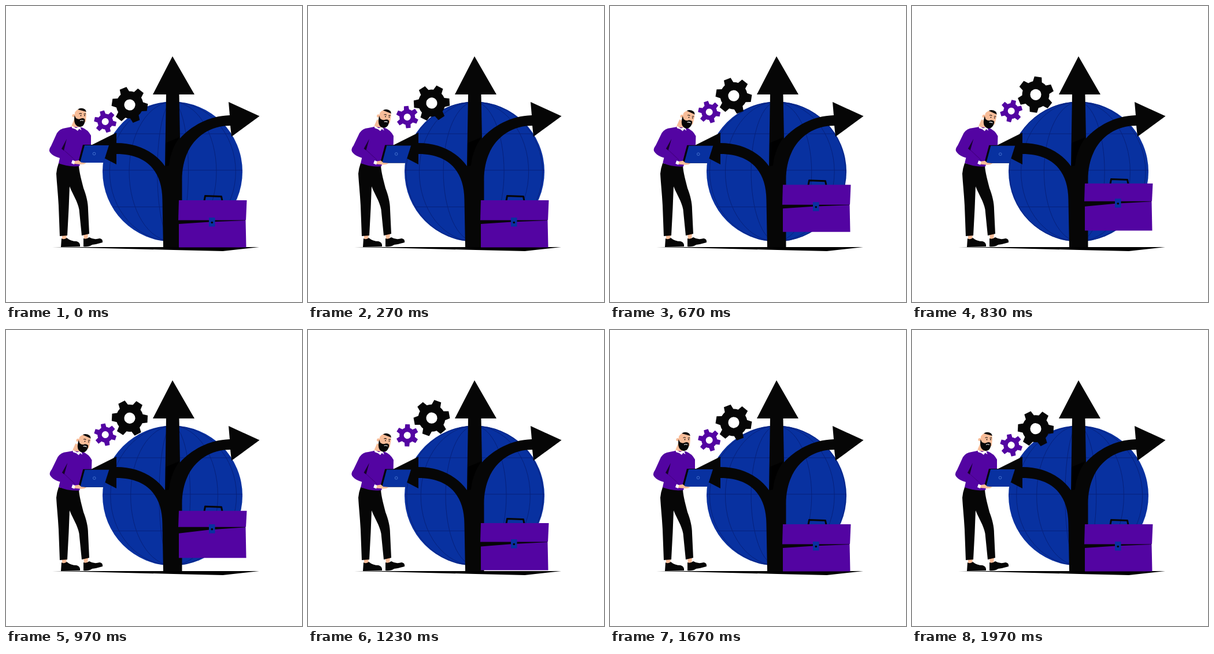
Recreate the animation shown at these times as an HTML page. Size 512 by 512 pixels, loop 2000 ms.

```html
<!DOCTYPE html>
<html lang="en">
<head>
<meta charset="utf-8">
<title>Choosing a career path</title>
<style>
  html, body { margin: 0; width: 100%; height: 100%; overflow: hidden; background: #fff; }
  svg { display: block; width: 100%; height: 100%; }
  .ink { fill: #060606; }
  .violet { fill: #5304a2; }
  .blue { fill: #0831a0; }
  .skin { fill: #f8bd99; }
  .white { fill: #fff; }
  .grid { fill: none; stroke: #06217c; stroke-width: 1; }
</style>
</head>
<body>
<svg viewBox="0 0 512 512">
  <!-- globe -->
  <circle class="blue" cx="288" cy="286.5" r="121"/>
  <path class="grid" d="M187 221H389M167 284H409M184 347.500H392"/>
  <path class="grid" id="meridians"/>

  <!-- arrows -->
  <path class="ink" d="M288 87L326 153H299.500L301 229C320 208 350 190 387 189L385 166L438.500 190.500L390 226L388 207C340 207 303 243 304.500 304V417H272L270.500 335C270 284 242 256 191 256V274L137 246L191 219V237C226 237 256 251 275 277L277 153H254Z"/>
  <path d="M276 237L300 227C291 240 283 258 282 276L276 277Z" fill="#000"/>

  <path class="ink" id="bigGear" fill-rule="evenodd"/>
  <path class="violet" id="smallGear" fill-rule="evenodd"/>

  <path d="M80 417H438L375 424L290 422L150 418.500Z" fill="#000"/>

  <!-- briefcase -->
  <g id="briefcase">
    <path d="M343 337L344.500 328.500L372.500 329.500L374 337" fill="none" stroke="#060606" stroke-width="3" stroke-linejoin="round"/>
    <path class="ink" d="M299 360H414V380H299Z"/>
    <path class="violet" id="caseBody"/>
    <path class="violet" id="caseFlap"/>
    <g id="clasp">
      <path class="blue" d="M351 366H361.500V381.500H351Z"/>
      <circle class="ink" cx="356.300" cy="374.500" r="1.800"/>
    </g>
  </g>

  <!-- legs and shoes -->
  <path class="skin" d="M97 395H105L104 405H97ZM134 394H142L141 404H135Z"/>
  <g class="ink">
    <path d="M91 272L126 276C127 290 131 302 134 315C139 328 142 340 142 352L144 394L131 397L126.500 352C124 338 115 325 110 312L108.500 350L106 397L93 398L91 345C90 325 88 308 87 290Q88 280 91 272Z"/>
    <path d="M95 417L96 402Q100 405 105 401Q112 407 122 407Q129 409 128 416Z"/>
    <path d="M134 416V402Q139 404 144 400Q152 405 162 402Q168 403 167 409Q157 412 149 413Q143 417 134 416Z"/>
  </g>

  <!-- upper body -->
  <g id="torso">
    <path class="skin" d="M118 196L128 200L129 213L121 216L112.500 209Z"/>
    <path class="violet" d="M113 209L131 210Q142 214 147 224V242L134 250L127 277Q108 279 91 272L93 263Q81 260 76 253Q73 249 78 242L88 220Q93 212 103 211Z"/>
    <path d="M105 230L96 247L100 250Z" fill="#17032b"/>
    <path d="M100 249L119 266" fill="none" stroke="#43017f" stroke-width="1"/>
    <path class="white" d="M113.500 207L121 211L128 208.500L130.500 215L126.500 212.500L124 216L120 213L114 211Z"/>
  </g>

  <g id="head">
    <path class="skin" d="M119 184Q123 177 132 178Q139 180 139 188L138 200L128 207L115 206L118.500 194Z"/>
    <circle class="skin" cx="117" cy="189.500" r="2.600"/>
    <path class="ink" d="M124 179Q130 174.500 137 179L139 183Q132 181 124 179Z"/>
    <path class="ink" d="M118.500 189L121 194Q126 197 130 194.500Q134 193 136.500 196Q137 204 132 208Q126 211 121 206Q117 202 118.500 189Z"/>
    <path d="M128 198.500Q131 197 134 198.500" fill="none" stroke="#fff" stroke-width="1.200"/>
    <path d="M126.500 186.500Q129 185 131 186.500M134.500 187L138 186.500" fill="none" stroke="#060606" stroke-width="1"/>
    <circle class="ink" cx="129.500" cy="189.500" r=".9"/>
    <circle class="ink" cx="136" cy="189.500" r=".9"/>
  </g>

  <g id="laptop">
    <path class="ink" d="M133 240L179 240L168 271H130L125.500 268Z"/>
    <path class="blue" d="M136 241H178L168.500 271H128Z"/>
    <circle cx="152.500" cy="255.500" r="2.300" fill="none" stroke="#4673d0" stroke-width="1"/>
    <path class="white" d="M115 266.500L120 268.500L118 274L113 272Z"/>
    <path class="skin" d="M119.500 268L126 267L130 270.500L139 271.500Q136 274 130 274L118 273Z"/>
  </g>
</svg>
<script>
const LOOP = 2000;
const $ = id => document.getElementById(id);
const move = (id, value) => $(id).setAttribute('transform', value);
const shape = (id, d) => $(id).setAttribute('d', d);

// [time, value] tables
const GEAR_Y = [[0, 171], [90, 171], [270, 168], [530, 157.5], [670, 155.2], [970, 152.4],
  [1230, 152.2], [1670, 160], [1970, 170.7], [2000, 171]];
const CASE_Y = [[0, 0], [535, 0], [600, -15], [670, -26.7], [790, -29.5], [970, -23.4],
  [1100, -13], [1230, -2], [1290, 0], [2000, 0]];
const SEAM_Y = [[0, 0], [660, 0], [970, -6.5], [1230, -2], [1330, 0], [2000, 0]];
const LEAN = [[0, 0], [80, 0.1], [270, 0.65], [600, 1], [1000, 1], [1230, 0.65], [1600, 0], [2000, 0]];

// Smooth interpolation that never overshoots its points
function sample(points, t) {
  let i = 0;
  while (i < points.length - 2 && t >= points[i + 1][0]) i++;
  const slope = k => points[k + 1]
    ? (points[k + 1][1] - points[k][1]) / (points[k + 1][0] - points[k][0]) : 0;
  const tangent = k => {
    if (k === 0) return 0;
    const a = slope(k - 1), b = slope(k);
    return a * b > 0 ? 2 * a * b / (a + b) : 0;
  };
  const [t0, v0] = points[i], [t1, v1] = points[i + 1];
  const w = t1 - t0, u = (t - t0) / w, v = 1 - u;
  return v0 * (1 + 2 * u) * v * v + tangent(i) * w * u * v * v
    + v1 * u * u * (3 - 2 * u) - tangent(i + 1) * w * u * u * v;
}

function gearPath(outer, root, hole) {
  const at = (r, a) => `${(r * Math.cos(a)).toFixed(2)} ${(r * Math.sin(a)).toFixed(2)}`;
  let d = '';
  for (let k = 0; k < 6; k++) {
    const a = k * Math.PI / 3;
    d += k ? `A${root} ${root} 0 0 1 ` : 'M';
    d += `${at(root, a - 0.34)}L${at(outer, a - 0.2)}L${at(outer, a + 0.2)}L${at(root, a + 0.34)}`;
  }
  return d + `A${root} ${root} 0 0 1 ${at(root, -0.34)}Z`
    + `M${hole} 0A${hole} ${hole} 0 1 0 ${-hole} 0A${hole} ${hole} 0 1 0 ${hole} 0Z`;
}

function meridians(t) {
  const step = 360 / 14;
  const shift = t / 1000 * 2 * step % step;
  let d = '';
  for (let k = -4; k <= 5; k++) {
    const angle = -12.5 + k * step - shift;
    if (Math.abs(angle) >= 88) continue;
    const rx = 121 * Math.sin(angle * Math.PI / 180);
    d += `M288 166A${Math.abs(rx).toFixed(2)} 120.5 0 0 ${rx > 0 ? 1 : 0} 288 407`;
  }
  return d;
}

// The seam between flap and body lifts while the case drops
function drawCase(t) {
  const seam = sample(SEAM_Y, t);
  move('briefcase', `translate(0 ${sample(CASE_Y, t)})`);
  move('clasp', `translate(0 ${seam})`);
  shape('caseFlap', `M299 336H416.500L415 ${370.5 + seam}H298Z`);
  shape('caseBody', `M299 ${377 + seam * 0.3}L352 ${373.5 + seam * 0.7}L414.500 ${371 + seam}L415.500 417.500H299Z`);
}

function draw(t) {
  const turn = t / LOOP * 360;
  const lean = sample(LEAN, t);
  const smallY = 200 - 19 * Math.sin(Math.PI * t / LOOP);
  shape('meridians', meridians(t));
  move('bigGear', `translate(214 ${sample(GEAR_Y, t)}) rotate(${8 + turn})`);
  move('smallGear', `translate(171.7 ${smallY}) rotate(${13 - turn})`);
  drawCase(t);
  move('torso', `rotate(${1.6 * lean} 108 278)`);
  move('head', `translate(${4 * lean} ${1.5 * lean}) rotate(${9 * lean} 121 209)`);
  move('laptop', `translate(${0.3 * lean} ${0.7 * lean})`);
}

shape('bigGear', gearPath(31.5, 23.5, 9.6));
shape('smallGear', gearPath(19.5, 13.5, 6));

const start = performance.now();
function frame() {
  draw((performance.now() - start) % LOOP);
  requestAnimationFrame(frame);
}
frame();
</script>
</body>
</html>
```
